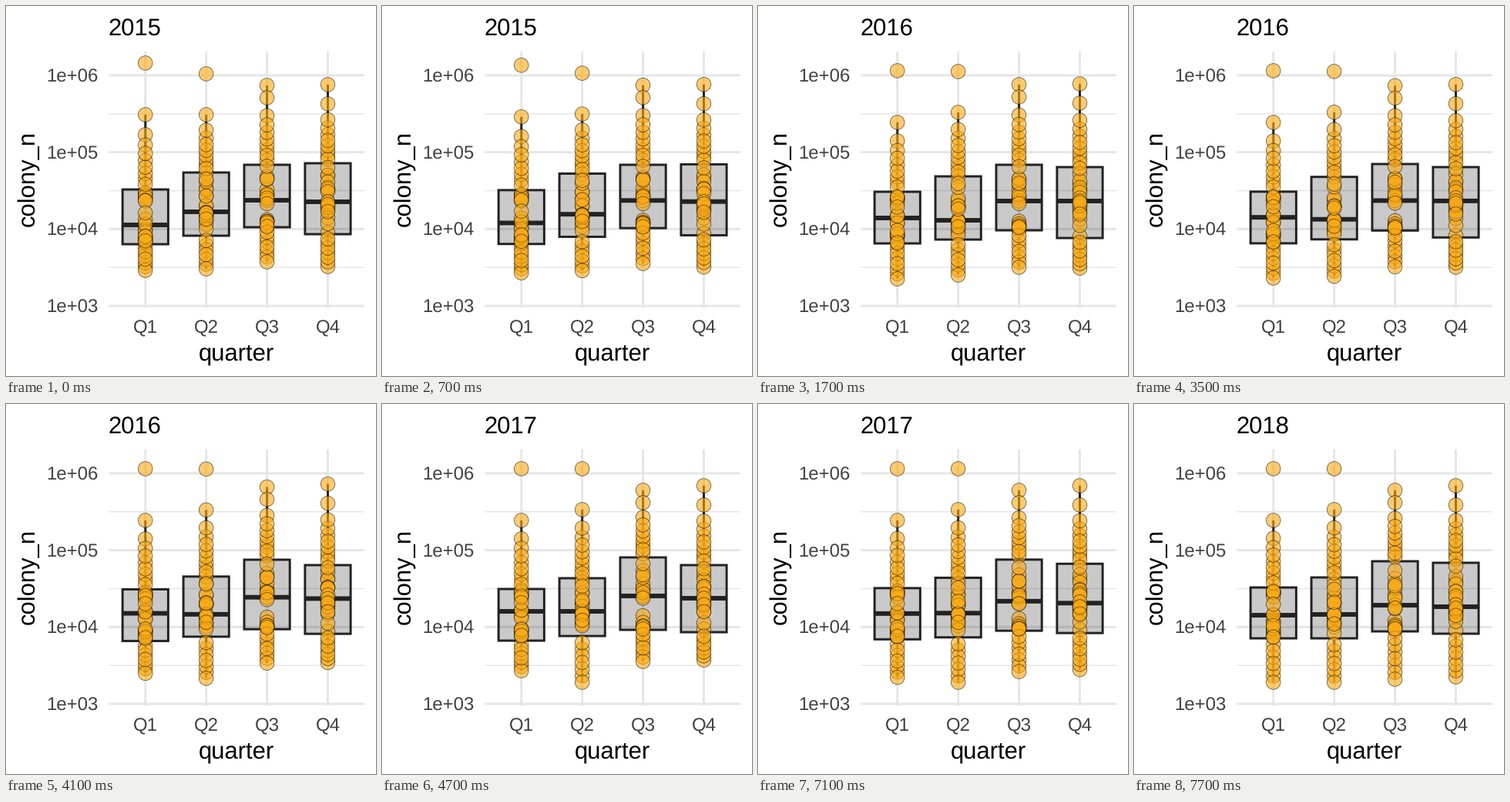
Recreate the animation shown at these times as a matplotlib script. Size 480x480 px, loop 8 s.

```python
import numpy as np
import matplotlib.pyplot as plt
from matplotlib.animation import FuncAnimation
from matplotlib.collections import EllipseCollection
from matplotlib.patches import Rectangle

SIZE = 480
INTERVAL = 100
FRAMES = 80
HOLD, CYCLE, STEP, STEPS = 500, 3000, 200, 7
TITLE_STEP = 5
FIRST_YEAR = 2015

LEFT, RIGHT, TOP, BOTTOM = 133.4, 464.8, 59, 391.5
FIRST_X, COLUMN_GAP = 180.8, 78.9
FIRST_Y, DECADE = 90, 99.67
HALF_BOX = 29.6
LINE = 2.96
FONT = 30.56
RADIUS = 9.3

INK = "#222222"
GRID = "#E6E6E6"
TICK = "#424242"
DOT = (0.98, 0.67, 0.09, 0.62)

plt.rcParams.update({
    "font.family": "Liberation Sans",
    "text.hinting": "none",
    "text.hinting_factor": 1,
})

# Per quarter: drop from the top point to the next one, whether the top
# point is an outlier, and a five-number summary on the stage for each year.
QUARTERS = {
    "Q1": (67, True, [(74, 238, 284, 309, 343), (84, 241, 275, 308, 354),
                      (84, 240, 269, 307, 346), (84, 238, 274, 304, 361)]),
    "Q2": (53, True, [(88, 216, 267, 298, 341), (85, 221, 278, 303, 349),
                      (84, 226, 269, 301, 361), (84, 225, 273, 304, 361)]),
    "Q3": (16, False, [(103, 206, 252, 287, 332), (102, 206, 253, 291, 339),
                       (112, 199, 249, 293, 334), (112, 204, 261, 295, 357)]),
    "Q4": (25, False, [(102, 204, 254, 296, 338), (101, 209, 253, 301, 340),
                       (106, 209, 252, 296, 332), (106, 206, 263, 298, 354)]),
}
rng = np.random.default_rng(12)


class Column:
    def __init__(self, ax, x, gap, outlier, summaries):
        self.x = x
        self.outlier = outlier
        self.stats = np.array(summaries, float)
        self.points = self.spread(gap)
        self.order = rng.permutation(self.points.shape[1])

        dark = dict(color=INK, solid_capstyle="butt", snap=False)
        self.whiskers = [ax.plot([x, x], [0, 0], lw=LINE, zorder=2, **dark)[0]
                         for _ in range(2)]
        self.box = Rectangle((x - HALF_BOX, 0), 2 * HALF_BOX, 1,
                             fc=(0, 0, 0, 0.21), ec=INK, lw=LINE,
                             joinstyle="miter", snap=False, zorder=3)
        ax.add_patch(self.box)
        self.median = ax.plot([x - HALF_BOX, x + HALF_BOX], [0, 0],
                              lw=2 * LINE, zorder=4, **dark)[0]
        size = np.full(len(self.order), 2 * RADIUS)
        self.dots = EllipseCollection(
            size, size, 0 * size, units="xy",
            offsets=np.zeros((len(size), 2)), offset_transform=ax.transData,
            facecolors=[DOT], edgecolors=[(0, 0, 0, 0.6)],
            linewidths=0.8, zorder=5)
        ax.add_collection(self.dots)

    def spread(self, gap):
        """Point heights per year: sparse tails around a scattered body."""
        top, upper, median, lower, bottom = self.stats.T[:, :, None]
        second = top + gap
        high_tail = (np.arange(9) / 9) ** 0.6
        low_tail = np.arange(7) / 7
        parts = [top,
                 second + (upper - second) * high_tail,
                 bottom + (lower - bottom) * low_tail]
        for a, b in ((upper, median), (median, lower)):
            share = rng.uniform(0, 1, 9) + rng.uniform(-0.1, 0.1, (4, 9))
            parts.append(a + (b - a) * np.clip(share, 0, 1))
        return np.hstack(parts)

    def update(self, year, share):
        def blend(poses):
            return poses[year] + (poses[year + 1] - poses[year]) * share

        top, upper, median, lower, bottom = blend(self.stats)
        points = blend(self.points)
        self.box.set_y(upper)
        self.box.set_height(lower - upper)
        self.median.set_ydata([median, median])
        self.whiskers[0].set_ydata([points[1] if self.outlier else top, upper])
        self.whiskers[1].set_ydata([lower, bottom])
        heights = points[self.order]
        self.dots.set_offsets(
            np.column_stack([np.full(len(heights), self.x), heights]))


def column_x(i):
    return FIRST_X + i * COLUMN_GAP


def draw_grid(ax):
    style = dict(color=GRID, solid_capstyle="butt", snap=False)
    label = dict(size=0.8 * FONT, color=TICK, va="baseline")
    for i in range(4):
        y = FIRST_Y + i * DECADE
        ax.plot([LEFT, RIGHT], [y, y], lw=LINE, zorder=1, **style)
        ax.text(119.5, y + 8.7, f"1e+0{6 - i}", ha="right", **label)
        if i < 3:
            mid = y + DECADE / 2
            ax.plot([LEFT, RIGHT], [mid, mid], lw=LINE / 2, zorder=0.5, **style)
    for i, name in enumerate(QUARTERS):
        x = column_x(i)
        ax.plot([x, x], [TOP, BOTTOM], lw=LINE, zorder=1, **style)
        ax.text(x, 424, name, ha="center", **label)


fig = plt.figure(figsize=(SIZE / 72, SIZE / 72), dpi=72, facecolor="white")
ax = fig.add_axes([0, 0, 1, 1])
ax.set_axis_off()
ax.set_autoscale_on(False)
ax.set_xlim(0, SIZE)
ax.set_ylim(SIZE, 0)

draw_grid(ax)
ax.text((LEFT + RIGHT) / 2, 459.3, "quarter", size=FONT, ha="center",
        va="baseline")
ax.text(36.5, (TOP + BOTTOM) / 2 - 0.8, "colony_n", size=FONT, rotation=90,
        rotation_mode="anchor", ha="center", va="baseline")
title = ax.text(LEFT - 0.7, 38, "", size=FONT, va="baseline")
columns = [Column(ax, column_x(i), *quarter)
           for i, quarter in enumerate(QUARTERS.values())]


def draw(i):
    elapsed = i * INTERVAL - HOLD
    year, step = 0, 0
    if elapsed >= 0:
        year, rest = divmod(elapsed, CYCLE)
        step = min(rest // STEP + 1, STEPS)
    for column in columns:
        column.update(year, step / STEPS)
    title.set_text(str(FIRST_YEAR + year + (step >= TITLE_STEP)))
    return []


anim = FuncAnimation(fig, draw, frames=FRAMES, interval=INTERVAL,
                     repeat=True, repeat_delay=0, blit=False)
plt.show()
```
